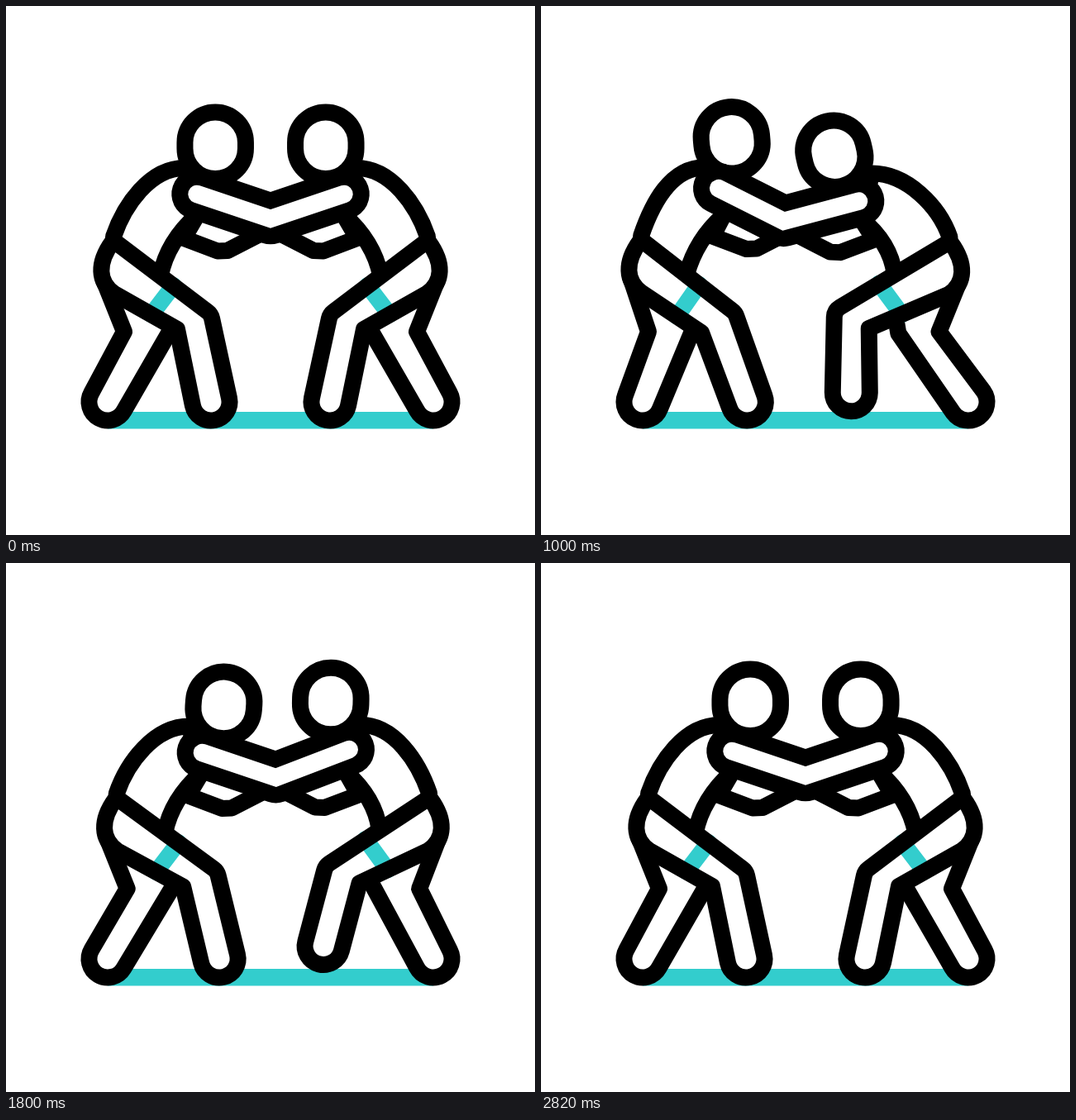
Animation of 640x640 px, one loop 2.96 s. Source, as an HTML page with a canvas:

```html
<!DOCTYPE html>
<html lang="en">
<head>
<meta charset="utf-8">
<title>Wrestlers</title>
<style>
  html, body { margin: 0; height: 100%; overflow: hidden; background: #fff; }
  canvas { display: block; width: 640px; height: 640px; }
</style>
</head>
<body>
<canvas id="stage" width="640" height="640"></canvas>
<script>
const ctx = document.getElementById('stage').getContext('2d');
const LOOP = 2960, CYAN = '#33cdcd', GROUND = 479;

// time, push (+ is right), left step, right step, left head lean
const KEYS = [
  [200, 0, 0, 0, 0],
  [640, 1.03, 1, 0, 1.03],
  [1120, -1.03, 0, 1, -1.03],
  [1600, 1.03, 1, 0, 1.03],
  [2080, -1.03, 0, 1, -1.03],
  [2480, .39, .05, 0, .65],
  [2820, 0, 0, 0, 0]
];

// Each joint: leaning back, neutral, leaning forward
const BODY = {
  waist: [[124, 285], [135, 286], [154, 287]],
  knee: [[232, 371], [248, 373], [286, 373]],
  crotch: [[191, 396], [207, 391], [244, 394]],
  rearKnee: [[127, 394], [143, 394], [162, 394]],
  rearThigh: [[181, 389], [202, 387], [209, 398]],
  shoulder: [[194, 195], [216, 196], [245, 204]],
  chest: [[218, 254], [232, 252], [258, 258]],
  elbow: [[206, 278], [215, 281], [242, 283]],
  head: [[222.5, 160], [253.2, 168.7], [292.5, 181]],
  tilt: [[-7], [0], [16]]
};
const ARMS = [
  [[211, 219], [231, 227.5], [264, 238]],
  [[287.5, 261], [320, 257.5], [354, 268.5]],
  [[379, 238], [409, 227.5], [441, 218]]
];

const ease = u => (1 - Math.cos(Math.PI * Math.min(1, u))) / 2;
const mix = (a, b, k) => a.map((v, i) => v + (b[i] - v) * k);
const add = (p, x, y) => [p[0] + x, p[1] + y];
const pose = (joint, p) => mix(joint[1], joint[p < 0 ? 0 : 2], Math.abs(p));

function stateAt(t) {
  const time = Math.min(Math.max(t, 200), 2819.9);
  const i = KEYS.findIndex((k, n) => n > 0 && time < k[0]);
  const a = KEYS[i - 1], b = KEYS[i];
  const u = (time - a[0]) / (b[0] - a[0]);
  const at = (n, speed = 1) => a[n] + (b[n] - a[n]) * ease(u * speed);
  const foot = n => [
    248 + 18 * at(n, 1.1),
    GROUND - 16 * Math.max(0, b[n] - a[n]) * Math.sin(Math.PI * u)
  ];
  return { push: at(1, 1.05), leftFoot: foot(2), rightFoot: foot(3), lean: at(4) };
}

function stroke(path, width = 20, color = '#000') {
  ctx.lineWidth = width;
  ctx.strokeStyle = color;
  ctx.stroke(path);
}

function shape(path) {
  ctx.fillStyle = '#fff';
  ctx.fill(path);
  stroke(path);
}

function polyline(points) {
  const path = new Path2D();
  points.forEach(p => path.lineTo(...p));
  return path;
}

// Goes down to the foot and around it, towards the other side of the leg
function addFoot(path, foot, top, clockwise) {
  const angle = Math.atan2(top[1] - foot[1], top[0] - foot[0]);
  const side = clockwise ? Math.PI / 2 : -Math.PI / 2;
  path.arc(...foot, 22.5, angle + side, angle - side, !clockwise);
}

function wrestler(p, foot, lean) {
  const j = {};
  for (const name in BODY)
    j[name] = pose(BODY[name], name === 'head' || name === 'tilt' ? lean : p);
  const { waist, rearKnee, rearThigh, shoulder, chest, elbow } = j;
  const seat = add(waist, -4, 62);
  // A lifted foot bends the leg further
  const lift = GROUND - foot[1];
  const knee = add(j.knee, lift * .55, lift * -.4);
  const crotch = add(j.crotch, lift * .55, lift * -.3);

  const rear = polyline([add(waist, -18, 43), rearKnee]);
  addFoot(rear, [123, GROUND], mix(rearKnee, rearThigh, .5), false);
  rear.lineTo(...rearThigh);
  rear.lineTo(...add(rearThigh, 2, -12));
  shape(rear);

  shape(polyline([chest, elbow, add(elbow, 41, 15.5), add(elbow, 53, 15), add(elbow, 90, -4)]));

  const torso = polyline([add(waist, -5, -7)]);
  torso.bezierCurveTo(...add(waist, 8, -45), ...add(shoulder, -42, 0), ...shoulder);
  torso.lineTo(...chest);
  torso.quadraticCurveTo(...add(elbow, -20, 4), ...mix(waist, knee, .46));
  shape(torso);

  const front = polyline([add(waist, -2, 0)]);
  front.arcTo(...knee, ...add(foot, 22, -5), 14);
  addFoot(front, foot, mix(knee, crotch, .5), true);
  front.lineTo(...crotch);
  front.lineTo(...seat);
  front.bezierCurveTo(...add(waist, -24, 48), ...add(waist, -25, 25), ...add(waist, -6, -1));
  front.closePath();
  ctx.fillStyle = '#fff';
  ctx.fill(front);
  stroke(polyline([mix(waist, knee, .6), mix(seat, crotch, .59)]), 20, CYAN);
  stroke(front);

  ctx.save();
  ctx.translate(...j.head);
  ctx.rotate(j.tilt[0] * Math.PI / 180);
  const head = new Path2D();
  head.roundRect(-36.75, -40.3, 73.5, 80.6, 36.75);
  shape(head);
  ctx.restore();
}

function draw(t) {
  const { push, leftFoot, rightFoot, lean } = stateAt(t);
  ctx.fillStyle = '#fff';
  ctx.fillRect(0, 0, 640, 640);
  ctx.fillStyle = CYAN;
  ctx.fillRect(123, 491, 394, 20.5);

  ctx.lineCap = ctx.lineJoin = 'round';
  wrestler(push, leftFoot, lean);
  ctx.save();
  ctx.translate(640, 0);
  ctx.scale(-1, 1);
  wrestler(-push, rightFoot, -push);
  ctx.restore();

  const arms = polyline(ARMS.map(joint => pose(joint, push)));
  stroke(arms, 61.5);
  ctx.lineJoin = 'miter';
  stroke(arms, 21.5, '#fff');
}

function tick() {
  draw(performance.now() % LOOP);
  requestAnimationFrame(tick);
}
tick();
</script>
</body>
</html>
```
